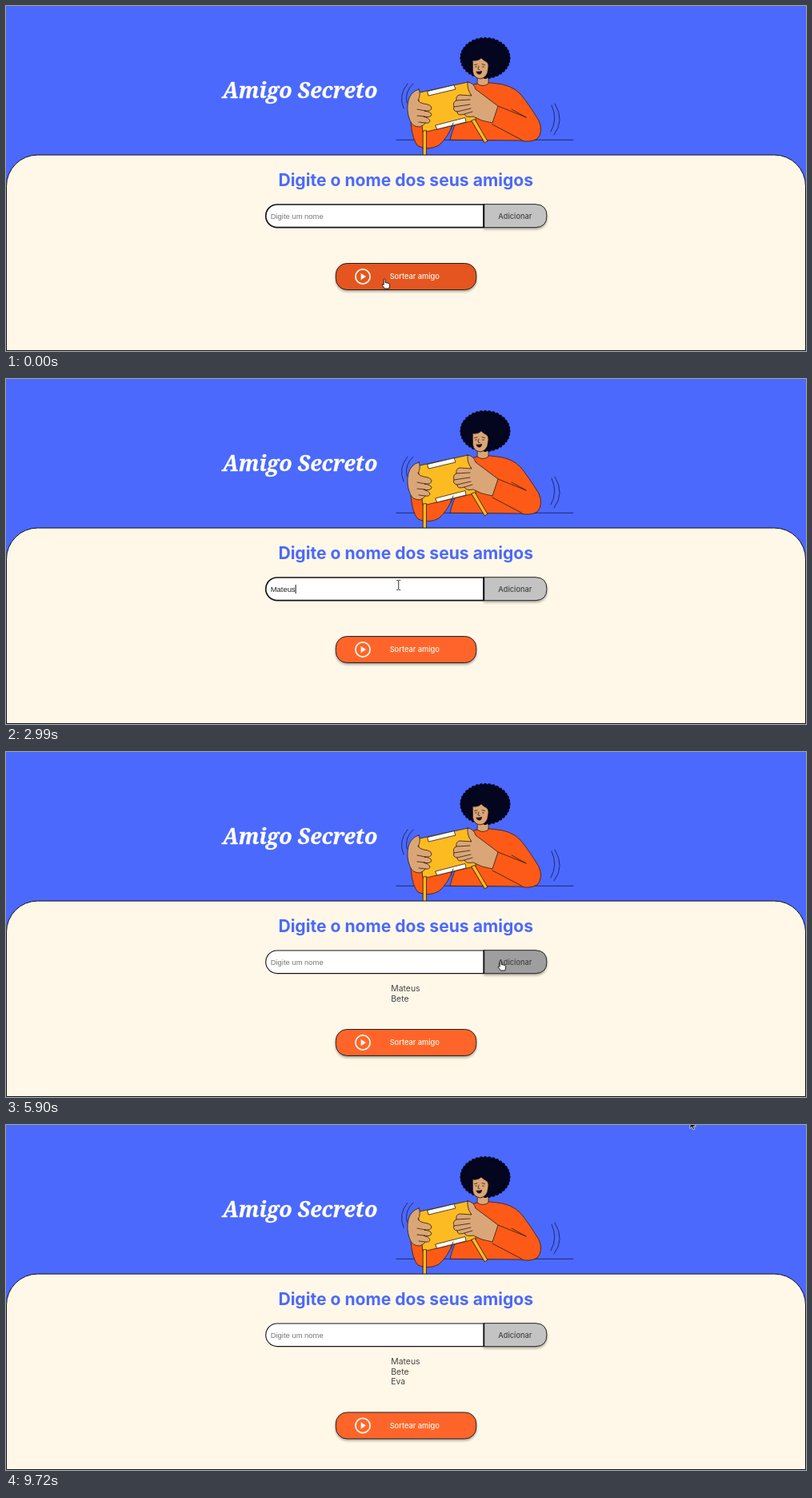
An HTML page that plays this animation: 1000x431 px, repeating every 9740 ms.

```html
<!DOCTYPE html>
<html lang="pt-BR">
<head>
<meta charset="utf-8">
<title>Amigo Secreto</title>
<style>
  html, body { margin: 0; width: 100%; height: 100%; overflow: hidden; background: #4b69fd; }
  svg { display: block; width: 100%; height: 100%; }
  text { font-family: Inter, sans-serif; white-space: pre; }
  .title { font: italic 800 26.6px "Noto Serif", serif; fill: #fff; stroke: #fff; stroke-width: .35; }
  .heading { font-size: 21.1px; font-weight: 700; fill: #4b69fd; }
  .label { font-size: 9.25px; font-weight: 500; }
  .entry { font: 9.43px "Liberation Sans", Arial, sans-serif; }
  .names { font-size: 10.42px; fill: #444; }
  .raised { filter: drop-shadow(0 2px 1.6px rgba(0, 0, 0, .32)); }
  .ink { stroke: #2c1c14; stroke-width: .8; stroke-linejoin: round; stroke-linecap: round; }
  .thin { fill: none; stroke: #1f2a6e; stroke-width: 1; stroke-linecap: round; }
</style>
</head>
<body>
<svg viewBox="0 0 1000 431">
  <rect width="1000" height="431" fill="#4b69fd"/>
  <text class="title" x="367.5" y="114.5" text-anchor="middle">Amigo Secreto</text>

  <g id="art">
    <path class="thin" d="M488 167.3H709"/>
    <path class="thin" d="M502 97Q490 111 497 128M509 97Q498 107 501 121M682 124Q690 141 681 157M686 122Q699 143 685 161"/>
    <g class="ink">
      <path fill="#fd5a17" d="M506 146Q508 168 515 175Q528 181 541 174Q553 164 559 146L530 130Z"/>
      <path fill="#fd5a17" d="M582 99Q596 94 610 96.5Q632 98 643 110Q653 122 666 143Q672 157 664 166Q655 171 643 168L555 167.3Q559 150 566 140Z"/>
      <path fill="#dba677" d="M589.5 86L589 97Q596 102 603 97L603 84Z"/>
    </g>
    <g id="hair" fill="#04051f"></g>
    <path class="ink" fill="#dba677" d="M583.5 68Q590 69 594 65Q597 68 601 70Q604 73 602.5 79Q602 89 593 91Q584.5 90 583.5 82Z"/>
    <path fill="none" class="ink" d="M585.5 73.5L589 72.8M595 72.6L598.5 73.5M586.5 76H588.5M595.5 76H597.5M591 75L590 79L592 79.4"/>
    <path fill="#25101a" d="M587.5 81.5Q591.5 82.3 595 80.8Q595 85.5 591.2 85.5Q588.3 85 587.5 81.5Z"/>
    <g class="ink">
      <path fill="#fdbb22" d="M515 108.5L578 95L587.5 142.5L521.5 158Z"/>
      <path fill="#fffaf0" d="M527 106.5L560 98.7L562 104L528.5 112Z"/>
      <path fill="#fffaf0" d="M537 149L574 139.5L575 145L539 154Z"/>
      <path fill="#fdbb22" d="M521.5 156L525.5 155.5L525.5 188H521.5Z"/>
      <path fill="#fdbb22" d="M582 143L586 141.5L602 169L598.5 170.5Z"/>
      <path fill="#dba677" d="M516 104Q506 107 503 118Q500 131 505 143Q508 151 517 151Q523 149 524 146Q530 147 530 143Q529 140 522 138Q531 140 532 135.5Q531 132 523 131Q532 132 532 127Q531 123 522 122Q517 121 515 118Q519 111 516 104Z"/>
      <path fill="none" d="M514 137L523 138M514 129L524 131M516 145L524 146"/>
      <path fill="#fd5a17" stroke="none" d="M615 125L650 139L660 166L645 167L608 148Z"/>
      <path fill="none" d="M615 125L650 139M608 148L645 167.5M632 129L650 139"/>
      <path fill="#dba677" d="M577 95Q585 96 587 104L615 125L608 146Q594 144 584 138Q575 140 573 135Q564 138 564 132Q558 131 560 126Q558 120 563 118Q562 112 567 111L582 112Q576 104 577 95Z"/>
      <path fill="none" d="M563 118L580 117M560 126L580 123M564 132L581 128M573 135L583 132"/>
      <path fill="none" d="M556 154L559 146"/>
    </g>
  </g>

  <path d="M.5 430.5V225.1A39 39 0 0 1 39.5 186.1H960.5A39 39 0 0 1 999.5 225.1V430.5Z" fill="#fff8e8" stroke="#111" stroke-width="1"/>
  <text class="heading" x="499.7" y="224.5" text-anchor="middle">Digite o nome dos seus amigos</text>

  <g class="raised">
    <path id="add" d="M597.5 247.7H662Q676 248.2 676 262.2T662 276.7H597.5Z" stroke="#222"/>
  </g>
  <text class="label" x="636.3" y="265.6" text-anchor="middle" fill="#444">Adicionar</text>
  <path id="field" d="M597 248H339A14.3 14.3 0 0 0 339 276.6H597Z" fill="#fff" stroke="#15131a"/>
  <path d="M597.5 247.5V277" stroke="#15131a" stroke-width="1.5"/>
  <text id="entry" class="entry" x="330.7" y="265.6"></text>
  <path id="caret" d="M0 257V268" stroke="#111" stroke-width="1"/>

  <g class="names" id="names"></g>

  <g id="draw">
    <rect id="drawBox" class="raised" x="412.3" y="321.5" width="175.5" height="33" rx="14" stroke="#222"/>
    <circle cx="446" cy="338" r="9.1" fill="none" stroke="#fff8e8" stroke-width="1.8"/>
    <path d="M443.6 333.8L450 338L443.6 342.2Z" fill="#fff8e8"/>
    <text class="label" x="510.8" y="341.3" text-anchor="middle" fill="#fff8e8">Sortear amigo</text>
  </g>

  <g id="pointer">
    <path id="hand" fill="#fff" stroke="#111" stroke-width=".9" stroke-linejoin="round" d="M-2.8 1.5V-5.5Q-2 -7 -.9 -5.5V-1.5L.8 -1.2L2.4 -.8L4 -.1Q4.8 .4 4.7 2Q4.6 4 3.6 6H-1.8Q-2.6 4.4 -4.6 2.2Q-5.4 .6 -4 .5Z"/>
    <path id="beam" fill="none" stroke="#333" stroke-width="1" d="M-2.5 -6H-.6L0 -5.4L.6 -6H2.5M0 -5.4V5.4M-2.5 6H-.6L0 5.4L.6 6H2.5"/>
    <path id="arrow" fill="#111" stroke="#fff" stroke-width=".7" d="M-2 -6V4.5L.4 2.4L2 6L3.8 5.2L2.2 1.8H5.4Z"/>
  </g>
</svg>

<script>
const LOOP = 9740, ROW = 12.5;
const friends = ["Mateus", "Bete", "Eva"];
const $ = id => document.getElementById(id);

function add(parent, tag, attrs, text) {
  const el = document.createElementNS("http://www.w3.org/2000/svg", tag);
  for (const key in attrs) el.setAttribute(key, attrs[key]);
  if (text) el.textContent = text;
  parent.append(el);
  return el;
}

// Curly outline: small circles around a large ellipse
add($("hair"), "ellipse", { cx: 599, cy: 65, rx: 30, ry: 24.5 });
for (let i = 0; i < 36; i++) {
  const a = i / 36 * Math.PI * 2;
  add($("hair"), "circle", { cx: 599 + 29 * Math.cos(a), cy: 65 + 23.5 * Math.sin(a), r: 2.6 });
}

const rows = friends.map((name, i) => add($("names"), "text", { x: 481.3, y: 299.2 + i * ROW }, name));

// Field states: time, text, focused, names in the list
const states = [[0, "", true, 0]];
const keyTimes = [
  [1190, 1460, 1580, 1760, 1870, 2470],
  [4540, 4760, 4870, 4970],
  [6680, 6930, 7050]
];
const clicks = [[3370, 3560, 4010], [5720, 5900, 6370], [8180, 8360]];
friends.forEach((name, i) => {
  keyTimes[i].forEach((t, k) => states.push([t, name.slice(0, k + 1), true, i]));
  const [press, release, refocus] = clicks[i];
  states.push([press, name, false, i], [release, "", false, i + 1]);
  if (refocus) states.push([refocus, "", true, i + 1]);
});

// Pointer moves: first step, last step, number of steps, end x, end y
const moves = [
  [110, 210, 2, 467, 290],
  [420, 510, 3, 460, 255],
  [2830, 3370, 14, 615, 267],
  [3730, 4010, 7, 550, 267],
  [5360, 5580, 8, 620, 267],
  [6130, 6370, 6, 575, 264],
  [7640, 7900, 8, 622, 264],
  [8570, 8700, 5, 857, 0]
];

function pointerAt(t) {
  let x = 475, y = 347;
  for (const [start, end, steps, toX, toY] of moves) {
    if (t < start) break;
    const k = Math.min(steps, 1 + Math.floor((t - start) / (end - start) * (steps - 1) + 1e-6));
    const p = k / steps, e = p * p * (3 - 2 * p);
    x += (toX - x) * e;
    y += (toY - y) * e;
  }
  return [x, y];
}

const inside = (x, y, l, t, r, b) => x >= l && x <= r && y >= t && y <= b;
const show = (el, on) => el.setAttribute("visibility", on ? "visible" : "hidden");

function render(t) {
  const [, text, focused, count] = states.filter(s => s[0] <= t).pop();
  const [x, y] = pointerAt(t);
  const shift = count * ROW;
  const onAdd = inside(x, y, 598, 247, 676, 277);
  const onField = inside(x, y, 324, 247, 598, 277);
  const onDraw = inside(x, y, 412, 321 + shift, 588, 355 + shift);

  const entry = $("entry");
  entry.textContent = text || "Digite um nome";
  entry.setAttribute("fill", text ? "#222" : "#777");
  $("field").setAttribute("stroke-width", focused ? 1.7 : 1.1);
  show($("caret"), focused && text);
  if (text) $("caret").setAttribute("transform", `translate(${331.2 + entry.getComputedTextLength()})`);

  rows.forEach((row, i) => show(row, i < count));
  $("draw").setAttribute("transform", `translate(0 ${shift})`);
  $("add").setAttribute("fill", onAdd ? "#9e9e9e" : "#c3c3c3");
  $("drawBox").setAttribute("fill", onDraw ? "#e55520" : "#ff652b");

  $("pointer").setAttribute("transform", `translate(${x} ${y})`);
  show($("hand"), onAdd || onDraw);
  show($("beam"), onField);
  show($("arrow"), !onAdd && !onDraw && !onField);
}

const begin = performance.now();
function tick() {
  render((performance.now() - begin) % LOOP);
  requestAnimationFrame(tick);
}
tick();
</script>
</body>
</html>
```
